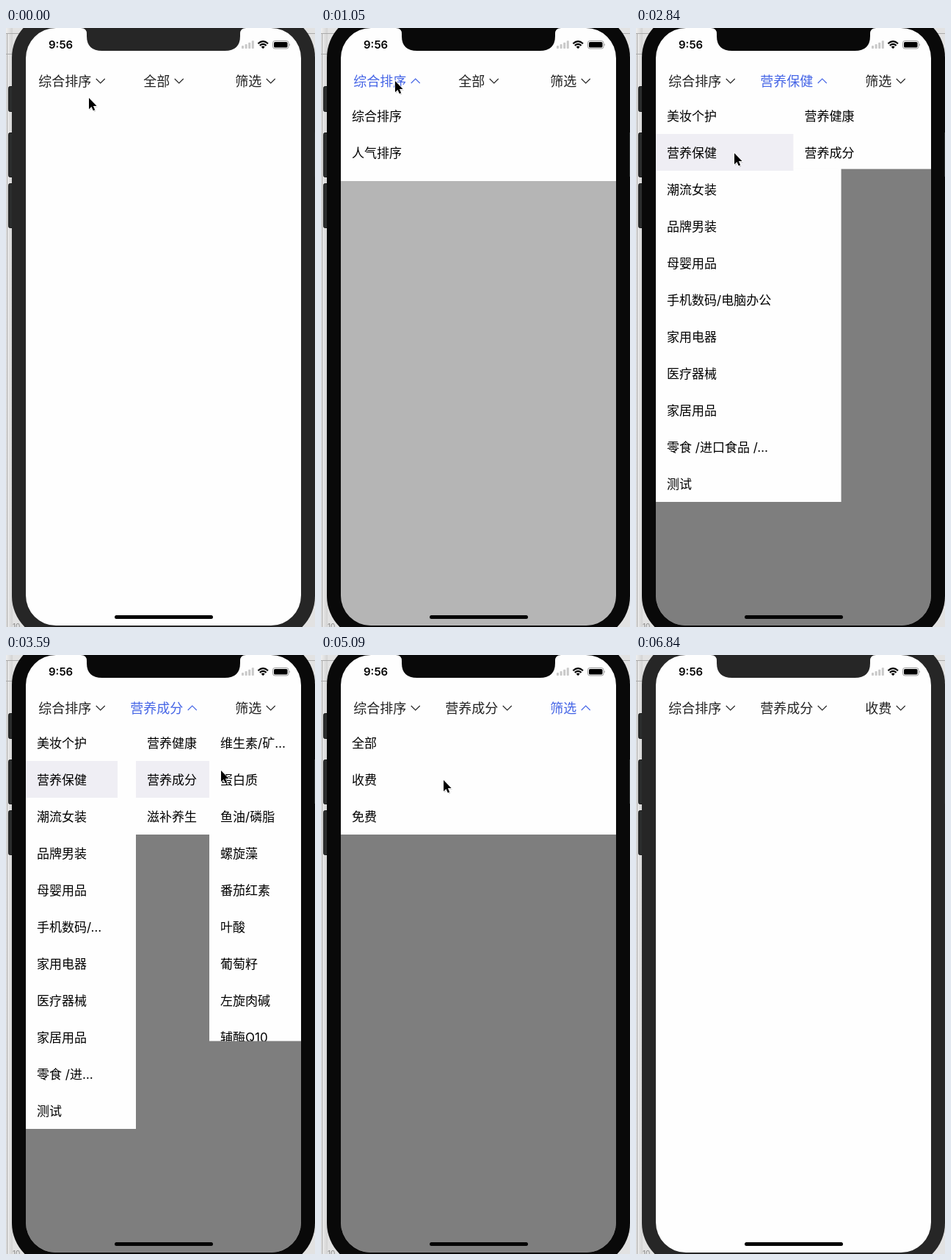
Animation of 421 by 814 pixels, one loop 6.94 s. Source, as an HTML page:

```html
<!DOCTYPE html>
<html lang="zh-CN">
<head>
<meta charset="utf-8">
<title>Dropdown menu</title>
<style>
html, body { margin: 0; width: 100%; height: 100%; overflow: hidden; background: #e6e6e6; }
svg { display: block; }
#stage { width: 421px; height: 814px; }
text { font-family: Inter, "Noto Sans CJK SC", "Noto Sans CJK", sans-serif; }
.title { font-size: 18px; }
.row { font-size: 17px; }
</style>
</head>
<body>
<svg id="stage" viewBox="0 0 421 814">
  <defs>
    <clipPath id="screen"><rect x="27" y="0" width="375" height="812" rx="41"/></clipPath>
    <linearGradient id="strip">
      <stop offset="0" stop-color="#efefef"/><stop offset="1" stop-color="#d2d2d2"/>
    </linearGradient>
  </defs>
  <rect width="421" height="814" fill="#e2e2e2"/>
  <rect width="9" height="814" fill="url(#strip)"/>
  <path d="M1.5 8V814M0 7.5H20M0 35.5H9M409 7.5H421M413 35.5H421" stroke="#aaa" fill="none"/>
  <text x="9" y="817" font-size="10" fill="#888">10</text>
  <g fill="#2b2d2d" stroke="#171818">
    <rect x="3.5" y="79.5" width="8" height="34" rx="2"/>
    <rect x="3.5" y="142.5" width="8" height="60" rx="2"/>
    <rect x="3.5" y="211.5" width="8" height="60" rx="2"/>
  </g>
  <rect id="body" x="8" y="-19" width="413" height="850" rx="59"/>
  <path d="M420.5 142V202" stroke="#2b2d2d"/>
  <g clip-path="url(#screen)">
    <rect x="27" width="375" height="812" fill="#fefefe"/>
    <rect id="shade" x="27" y="94" width="375" height="718"/>
    <g id="lists"></g>
    <g id="tabs"></g>
  </g>
  <path id="notch" d="M102 -1V0Q110 0 110 8V11Q110 31 131 31H298Q319 31 319 11V8Q319 0 327 0V-1Z"/>
  <text x="58" y="28" font-size="15" font-weight="600">9:56</text>
  <g fill="#c9c9c9">
    <rect x="321" y="24" width="3" height="4" rx=".8"/>
    <rect x="325.6" y="22" width="3" height="6" rx=".8"/>
    <rect x="330.2" y="19.7" width="3" height="8.3" rx=".8"/>
    <rect x="334.8" y="17.2" width="3" height="10.8" rx=".8"/>
  </g>
  <g fill="none" stroke="#000" stroke-width="2.1">
    <path d="M343.4 21.2Q350.2 15.2 357 21.2M345.8 23.9Q350.2 20 354.6 23.9"/>
    <path d="M347.7 25.5Q350.2 23.6 352.7 25.5L350.2 28.2Z" fill="#000" stroke="none"/>
  </g>
  <rect x="363.5" y="17.5" width="21.5" height="10.5" rx="2.8" fill="none" stroke="#999"/>
  <rect x="365" y="19" width="18.5" height="7.5" rx="1.6"/>
  <path d="M386.2 21Q388 22.7 386.2 24.6Z" fill="#888"/>
  <rect x="148" y="798" width="134" height="5" rx="2.5" fill="#050505"/>
  <g id="cursor">
    <path d="M1 1.5V17L4.6 13.7L7 19L9.4 18L7.1 12.8H12Z" fill="#000" opacity=".18"/>
    <path d="M0 0V15.2L3.5 12L5.8 17.3L8.2 16.2L5.9 11.1H10.6Z" stroke="#fff" stroke-width="1.6" paint-order="stroke"/>
  </g>
</svg>
<script>
const LOOP = 6940, TOP = 94, ROW = 50, LEFT = 27, FULL = 375;
const $ = id => document.getElementById(id);

const sorts = ['综合排序', '人气排序', '价格最高', '价格最低'];
const kinds = ['美妆个护', '营养保健', '潮流女装', '品牌男装', '母婴用品', '手机数码/电脑办公',
  '家用电器', '医疗器械', '家居用品', '零食 /进口食品 /饮料', '测试'];
const groups = ['营养健康', '营养成分', '滋补养生'];
const items = ['维生素/矿物质', '蛋白质', '鱼油/磷脂', '螺旋藻', '番茄红素', '叶酸', '葡萄籽', '左旋肉碱',
  '辅酶Q10', '益生菌', '玛咖', '膳食纤维', '牛初乳', '胶原蛋白', '大豆卵磷脂'];
const fees = ['全部', '收费', '免费'];

const mix = (a, b, p) => a + (b - a) * p;
// One list column: x and w run from the screen's left edge, cell is the laid-out row width.
const col = (list, x, w, h, sel = -1, cell = w) => ({ list, x, w, h, sel, cell });

const sortMenu = p => [col(sorts, 0, FULL, mix(0, 200, p))];
const kindMenu = p => [col(kinds, 0, FULL, mix(200, 550, p))];
const groupMenu = p => [
  col(kinds, 0, mix(FULL, 187.5, p), 550, 1, 187.5),
  col(groups, 187.5, 187.5, mix(0, 150, p))];
const itemMenu = p => [
  col(kinds, 0, mix(187.5, 125, p), 550, 1, 125),
  col(groups, mix(187.5, 125, p), mix(187.5, 125, p), 150, 1, 125),
  col(items, 250, 125, mix(0, 718, p))];
const feeMenu = p => [col(fees, 0, mix(125, FULL, p), mix(550, 150, p), -1, FULL)];
const feeClose = p => [col(fees, 0, FULL, mix(150, 0, p), 1)];

// Each step changes some of the state and holds until the next one.
const steps = [
  [0, { names: ['综合排序', '全部', '筛选'], open: -1, cols: [], dim: 0, live: false }],
  [900, { live: true }],
  [1050, { open: 0, cols: sortMenu(.57), dim: .29 }],
  [1200, { cols: sortMenu(1), dim: .5 }],
  [2090, { open: 1, cols: kindMenu(.6) }],
  [2240, { cols: kindMenu(1) }],
  [2840, { names: ['综合排序', '营养保健', '筛选'], cols: groupMenu(.652) }],
  [2990, { cols: groupMenu(1) }],
  [3590, { names: ['综合排序', '营养成分', '筛选'], cols: itemMenu(.6) }],
  [3740, { cols: itemMenu(1) }],
  [4490, { open: 2, cols: feeMenu(.6) }],
  [4640, { cols: feeMenu(1) }],
  [5390, { names: ['综合排序', '营养成分', '收费'], open: -1, cols: feeClose(.6), dim: .2 }],
  [5540, { cols: [], dim: 0 }],
  [6840, { live: false }]
];
const moves = [
  [0, 113, 95], [300, 111, 90], [450, 104, 78], [600, 101, 72],
  [1350, 105, 73], [1500, 128, 74], [1650, 162, 75], [1800, 196, 74], [1940, 209, 73],
  [2390, 204, 84], [2540, 170, 132], [2690, 134, 170], [2990, 257, 157], [3140, 293, 157],
  [3890, 296, 146], [4040, 306, 114], [4190, 318, 82], [4340, 320, 75],
  [4640, 311, 82], [4790, 250, 122], [4940, 185, 162], [5090, 167, 170],
  [5840, 169, 186], [5990, 180, 310], [6140, 204, 550], [6290, 220, 703], [6840, -50, -50]
];

const textWidth = s => [...s].reduce((w, c) => w + (c === '…' ? 15 : c < '\u0100' ? 6 : 17), 0);
function fit(s, room) {
  if (textWidth(s) <= room) return s;
  while (textWidth(s + '…') > room) s = s.slice(0, -1);
  return s + '…';
}

function listMarkup({ list, x, w, h, sel, cell }) {
  const mark = sel < 0 ? '' : `<rect y="${sel * ROW}" width="${cell}" height="${ROW}" fill="#efeef4"/>`;
  const rows = list.map((s, i) =>
    `<text class="row" x="15" y="${i * ROW + 31.5}">${fit(s, cell - 33)}</text>`).join('');
  return `<svg x="${LEFT + x}" y="${TOP}" width="${w}" height="${h}" overflow="hidden">
    <rect width="${w}" height="${h}" fill="#fefefe"/>${mark}${rows}</svg>`;
}

function tabMarkup(name, i, open) {
  const w = name.length * 18;
  const x = 89.5 + i * 125 - (w + 18.5) / 2;
  const color = i === open ? '#4565e6' : '#222';
  const [a, b] = i === open ? [75, 69] : [69, 75];
  const c = x + w + 6.5;
  return `<text class="title" x="${x}" y="78.5" fill="${color}">${name}</text>
    <path d="M${c} ${a}L${c + 6} ${b}L${c + 12} ${a}" fill="none" stroke="${color}" stroke-width="1.1"/>`;
}

let shown = -1;
function draw(t) {
  const past = steps.filter(s => s[0] <= t);
  if (past.length !== shown) {
    shown = past.length;
    const s = Object.assign({}, ...past.map(p => p[1]));
    const shell = s.live ? '#090909' : '#262626';
    $('body').setAttribute('fill', shell);
    $('notch').setAttribute('fill', shell);
    $('shade').setAttribute('opacity', s.dim);
    $('lists').innerHTML = s.cols.map(listMarkup).join('');
    $('tabs').innerHTML = s.names.map((n, i) => tabMarkup(n, i, s.open)).join('');
  }
  const [, x, y] = moves.filter(m => m[0] <= t).pop();
  $('cursor').setAttribute('transform', `translate(${x} ${y})`);
}

const start = performance.now();
function tick() {
  draw((performance.now() - start) % LOOP);
  requestAnimationFrame(tick);
}
tick();
</script>
</body>
</html>
```
